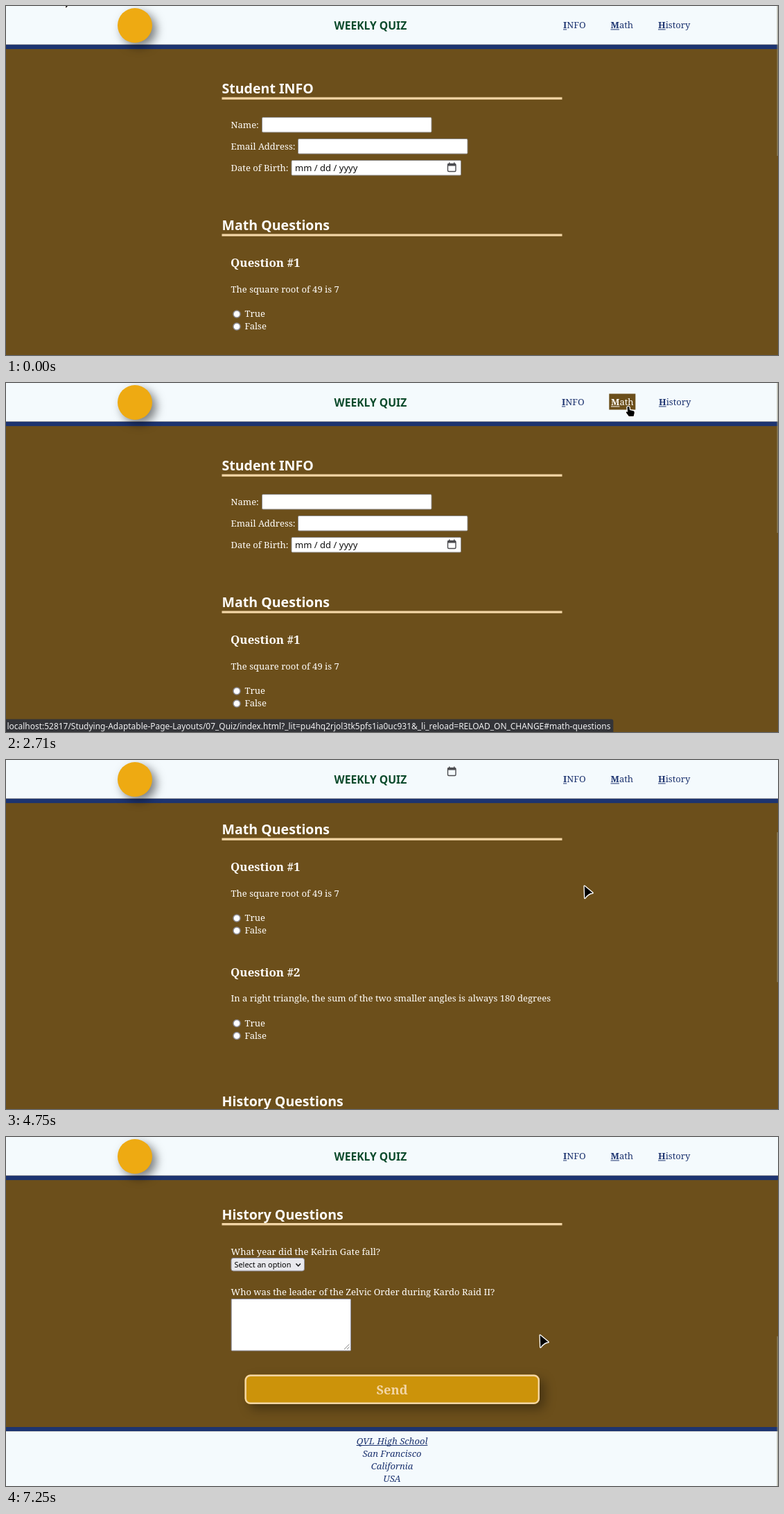
An HTML page with a canvas for the animation above (8 s loop, 1114 px wide and 503 px high).

```html
<!DOCTYPE html>
<html lang="en">
<head>
<meta charset="utf-8">
<title>Weekly quiz</title>
<style>
  html, body { margin: 0; width: 100%; height: 100%; overflow: hidden; background: #6c4f1b; }
  canvas { display: block; width: 1114px; height: 503px; }
</style>
</head>
<body>
<canvas id="stage" width="1114" height="503"></canvas>
<script>
const ctx = document.getElementById('stage').getContext('2d');
const W = 1114, H = 503, LOOP = 8000;
const BROWN = '#6c4f1b', NAVY = '#1d3470', PALE = '#f4fafd', SAND = '#f2d5a5', WHITE = '#fffdfa';
const SANS = '"Noto Sans", sans-serif', SERIF = '"Noto Serif", serif';
const BODY = `13.05px ${SERIF}`, HEADING = `bold 19.57px ${SANS}`, URL_FONT = `11.96px ${SANS}`;

// Keys are [time, value...]
const CURSOR = [
  [0, 85, -15], [40, 88, -12], [280, 300, 260], [500, 600, 448], [830, 965, 400],
  [880, 940, 388], [1250, 171, 50], [1360, 360, 5], [1600, 770, 16], [1680, 818, 22],
  [1750, 832, 12], [1790, 832, 12], [1900, 834, 4], [2060, 824, 24], [2500, 830, 27],
  [2540, 842, 28], [2700, 898, 34], [2920, 898, 34], [3080, 955, 30], [3460, 962, 31],
  [3700, 820, 159], [3790, 820, 159], [3950, 834, 181], [5879, 834, 181]
];
const RESTS = [[5880, 774, 233], [6080, 497, 323], [6380, 560, 360], [6750, 719, 325],
  [6920, 766, 289], [7080, 774, 286], [7250, 770, 285]];
const SCROLL = [[0, 0], [4030, 0], [4250, 108], [4500, 108], [4750, 216], [4880, 216],
  [5290, 541], [5540, 541], [5630, 596]];
const HOVERS = [[1640, 2560], [2560, 2990], [2990, 3520]];
const LINKS = ['INFO', 'Math', 'History'];
const LINK_X = [[805, 875, 942], [802, 873, 942], [802, 870.5, 941]];
const LINK_REST = [804, 872.5, 941];

const URL_BASE = 'localhost:52817/Studying-Adaptable-Page-Layouts/07_Quiz/index';
const URL_TAIL = '.html?_lit=pu4hq2rjol3tk5pfs1ia0uc931&_li_reload=RELOAD_ON_CHANGE#';

const clamp = v => Math.max(0, Math.min(1, v));
const ease = v => v * v * (3 - 2 * v);

function sample(keys, t, curve = v => v) {
  const i = keys.findIndex(k => k[0] > t);
  if (i < 0) return keys[keys.length - 1].slice(1);
  const a = keys[i - 1], b = keys[i], p = curve((t - a[0]) / (b[0] - a[0]));
  return a.slice(1).map((v, n) => v + (b[n + 1] - v) * p);
}

function text(str, x, y, font = BODY, color = WHITE, align = 'left') {
  ctx.font = font;
  ctx.fillStyle = color;
  ctx.textAlign = align;
  ctx.fillText(str, x, y);
}

function rect(x, y, w, h, color) {
  ctx.fillStyle = color;
  ctx.fillRect(x, y, w, h);
}

function box(x, y, w, h, radius, fill, stroke, line = 1) {
  ctx.beginPath();
  ctx.roundRect(x, y, w, h, radius);
  ctx.fillStyle = fill;
  ctx.fill();
  if (!stroke) return;
  ctx.strokeStyle = stroke;
  ctx.lineWidth = line;
  ctx.stroke();
}

function polyline(points, color, width) {
  ctx.beginPath();
  points.forEach(([x, y]) => ctx.lineTo(x, y));
  ctx.strokeStyle = color;
  ctx.lineWidth = width;
  ctx.stroke();
}

function withShadow(alpha, blur, offset, draw) {
  ctx.save();
  ctx.shadowColor = `rgba(0,0,0,${alpha})`;
  ctx.shadowBlur = blur;
  ctx.shadowOffsetX = ctx.shadowOffsetY = offset;
  draw();
  ctx.restore();
}

function section(title, baseline) {
  text(title, 311.5, baseline, HEADING);
  rect(311.5, baseline + 5.5, 491, 3.3, SAND);
}

function field(label, x, y) {
  text(label, 324.5, y + 15.5);
  box(x + .5, y + .5, 244.5, 21.5, 1.5, '#fff', '#8c8a88');
}

function radio(label, y) {
  ctx.beginPath();
  ctx.arc(333, y, 5, 0, Math.PI * 2);
  ctx.fillStyle = '#fff';
  ctx.fill();
  ctx.strokeStyle = '#8f8f98';
  ctx.lineWidth = 1.5;
  ctx.stroke();
  text(label, 344.5, y + 4.2);
}

function question(number, statement, y) {
  text(`Question #${number}`, 324, y, `bold 16.96px ${SERIF}`);
  text(statement, 324.5, y + 36.5);
  radio('True', y + 68);
  radio('False', y + 86);
}

function sendButton(hovered) {
  const fill = hovered ? '#a8790f' : '#cc930a';
  withShadow(.35, 16, 7, () => box(344.5, 938.5, 425.5, 42.5, 8, fill));
  box(345.7, 939.7, 423.1, 40.1, 7, fill, SAND, 2.4);
  text('Send', 557, 966.5, `bold 18.27px ${SERIF}`, SAND, 'center');
}

function footer() {
  rect(0, 1014, W, 6.2, NAVY);
  rect(0, 1020.2, W, 90, PALE);
  const lines = ['QVL High School', 'San Francisco', 'California', 'USA'];
  lines.forEach((line, i) => text(line, 557, 1038.5 + i * 18, `italic ${BODY}`, NAVY, 'center'));
  ctx.font = `italic ${BODY}`;
  const width = ctx.measureText(lines[0]).width;
  rect(557 - width / 2, 1040, width, 1, NAVY);
}

function page(hovered) {
  section('Student INFO', 126);
  field('Name:', 369, 160);
  field('Email Address:', 421, 191);
  field('Date of Birth:', 411.5, 222);
  text('mm / dd / yyyy', 417, 238, `13.05px ${SANS}`, '#111');

  section('Math Questions', 323);
  question(1, 'The square root of 49 is 7', 376);
  question(2, 'In a right triangle, the sum of the two smaller angles is always 180 degrees', 527.5);

  section('History Questions', 714.5);
  text('What year did the Kelrin Gate fall?', 324.5, 765.5);
  box(325, 770.5, 105.5, 18.5, 3, '#e9e9ed', '#8f8f9d');
  text('Select an option', 329.5, 784, `10.87px ${SANS}`, '#000');
  polyline([[418.5, 778.5], [421.8, 782], [425, 778.5]], '#111', 1.5);
  text('Who was the leader of the Zelvic Order during Kardo Raid II?', 324.5, 823.5);
  box(325.2, 829.5, 172.3, 74.5, 1, '#fff', '#8f8f9d');
  polyline([[488, 902], [495.5, 894.5]], '#888', 1);
  polyline([[492, 902], [495.5, 898.5]], '#888', 1);
  sendButton(hovered);
  footer();
}

function calendar(y) {
  box(637.5, y - 5, 11.5, 11, 1.5, 'rgba(0,0,0,0)', '#4c4c50', 1.4);
  rect(637, y - 5, 12, 3, '#4c4c50');
  rect(639, y - 7, 1.5, 3, '#4c4c50');
  rect(646, y - 7, 1.5, 3, '#4c4c50');
}

function header(active) {
  rect(0, 0, W, 55.7, PALE);
  rect(0, 55.7, W, 6.4, NAVY);
  withShadow(.5, 14, 6, () => box(161, 3, 50, 50, 25, '#eeaa12'));
  text('WEEKLY QUIZ', 473.5, 33.7, `bold 15.66px ${SANS}`, '#0b4a2b');

  const xs = active < 0 ? LINK_REST : LINK_X[active];
  LINKS.forEach((label, i) => {
    const color = i === active ? WHITE : NAVY, x = xs[i];
    ctx.font = `bold ${BODY}`;
    const first = ctx.measureText(label[0]).width;
    ctx.font = BODY;
    const rest = ctx.measureText(label.slice(1)).width;
    if (i === active) rect(x - 2.7, 15.5, first + rest + 5.4, 23, BROWN);
    text(label[0], x, 31.7, `bold ${BODY}`, color);
    text(label.slice(1), x + first, 31.7, BODY, color);
    rect(x, 33.4, first, 1, color);
  });
}

function statusBar(t) {
  const alpha = Math.min(clamp((t - 2080) / 120), clamp((3950 - t) / 150));
  if (alpha <= 0) return;
  const grow = ease(clamp((t - 2540) / 150));
  const target = t < 2990 ? 'math-questions' : 'history-questions';
  const label = grow ? URL_BASE + URL_TAIL + target : URL_BASE + '…';
  ctx.save();
  ctx.globalAlpha = alpha;
  ctx.font = URL_FONT;
  const short = ctx.measureText(URL_BASE + '…').width;
  const full = ctx.measureText(label).width;
  box(-4, 484.5, short + (full - short) * grow + 9.5, 24, 3, '#333438');
  ctx.clip();
  text(label, 1.5, 498.8, URL_FONT, '#f1f1f2');
  ctx.restore();
}

function arrow() {
  ctx.moveTo(.7, .7);
  ctx.lineTo(12.5, 10.6);
  ctx.quadraticCurveTo(6.5, 11, 1.3, 18);
  ctx.closePath();
}

function hand() {
  ctx.moveTo(-1.5, 1);
  ctx.quadraticCurveTo(0, -1, 1.5, 1);
  ctx.lineTo(2, 5);
  ctx.lineTo(7.5, 6.3);
  ctx.quadraticCurveTo(9.3, 7, 8.7, 9.5);
  ctx.lineTo(7.5, 14);
  ctx.lineTo(.8, 14);
  ctx.lineTo(-3.2, 8.5);
  ctx.quadraticCurveTo(-2.5, 6.5, -.8, 8);
  ctx.closePath();
}

function cursor(t, overButton) {
  const rest = RESTS.filter(k => k[0] <= t).pop();
  const [x, y] = rest ? rest.slice(1) : sample(CURSOR, t);
  const overLink = t > 2000 && t < 3490;
  ctx.save();
  ctx.translate(x, y);
  ctx.beginPath();
  (overLink || overButton ? hand : arrow)();
  ctx.lineJoin = 'round';
  ctx.strokeStyle = '#fff';
  ctx.lineWidth = 2.6;
  ctx.stroke();
  ctx.fillStyle = '#000';
  ctx.fill();
  ctx.restore();
}

function draw(t) {
  const [scroll] = sample(SCROLL, t, ease);
  const overButton = t >= 6380 && t < 6750;
  rect(0, 0, W, H, BROWN);
  ctx.save();
  ctx.translate(0, -scroll);
  page(overButton);
  ctx.restore();
  header(HOVERS.findIndex(([from, to]) => t >= from && t < to));
  calendar(232.5 - scroll);
  rect(1112.5, scroll * .482, 1.5, 216, 'rgba(150,145,125,.65)');
  statusBar(t);
  cursor(t, overButton);
}

const start = performance.now();
function tick() {
  draw((performance.now() - start) % LOOP);
  requestAnimationFrame(tick);
}
tick();
</script>
</body>
</html>
```
